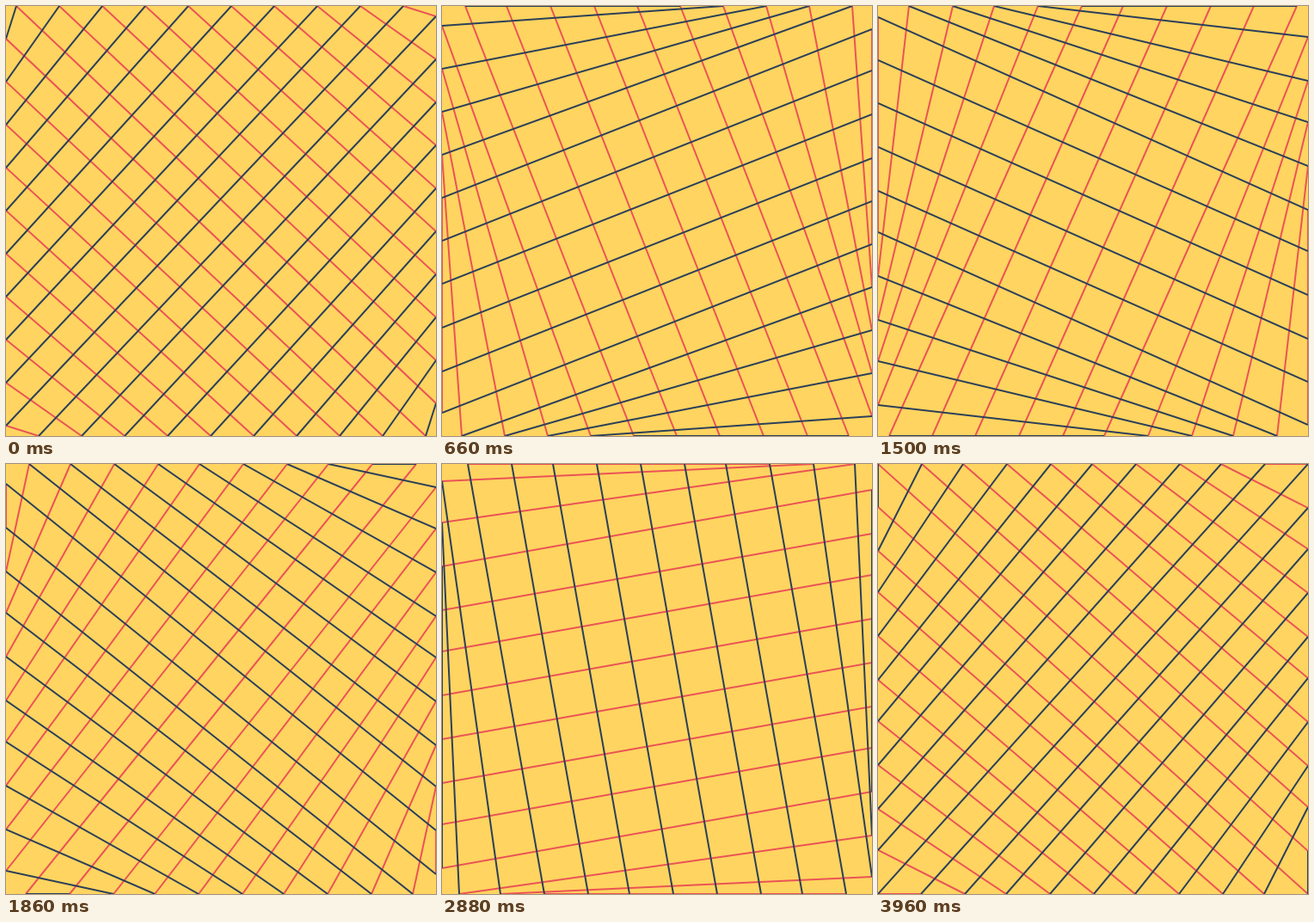
Recreate the animation shown at these times as an HTML page. Size 500 by 500 pixels, loop 4.02 s.

```html
<!DOCTYPE html>
<html lang="en">
<head>
<meta charset="utf-8">
<title>Rotating line weave</title>
<style>
  html, body { margin: 0; width: 100%; height: 100%; overflow: hidden; background: #ffd460; }
  svg { display: block; width: 100%; height: 100%; }
  path { fill: none; stroke-width: 2; }
</style>
</head>
<body>
<svg viewBox="0 0 500 500">
  <rect width="500" height="500" fill="#ffd460"/>
  <path id="red" stroke="#ea5455"/>
  <path id="navy" stroke="#2d4059"/>
</svg>
<script>
const SIZE = 500, POINTS = 40, SPACING = 50, STEP = 3;
const FRAME_MS = 60, LOOP_MS = 4020, TICKS_PER_FRAME = 5, FIRST_TICK = 4;
const SIDE_TICKS = Math.ceil(SIZE / STEP);
const red = document.getElementById('red');
const navy = document.getElementById('navy');

// Points travel clockwise and stop exactly on each corner before turning.
function pointAt(index, tick) {
  const start = index * SPACING;
  let side = Math.floor(start / SIZE);
  let along = start % SIZE;
  const toCorner = Math.ceil((SIZE - along) / STEP);
  if (tick >= toCorner) {
    const rest = tick - toCorner;
    side += 1 + Math.floor(rest / SIDE_TICKS);
    along = 0;
    tick = rest % SIDE_TICKS;
  }
  const d = along + tick * STEP;
  return [[d, 0], [SIZE, d], [SIZE - d, SIZE], [0, SIZE - d]][side % 4];
}

// Joins every pair of points whose indices add up to sum (modulo POINTS).
function weave(points, sum) {
  let path = '';
  points.forEach((a, i) => {
    const j = (sum - i + POINTS) % POINTS;
    if (i < j) path += `M${a}L${points[j]}`;
  });
  return path;
}

function draw(ms) {
  const frame = Math.floor((ms % LOOP_MS) / FRAME_MS);
  const tick = FIRST_TICK + frame * TICKS_PER_FRAME;
  const points = Array.from({ length: POINTS }, (_, i) => pointAt(i, tick));
  red.setAttribute('d', weave(points, POINTS / 2 - 1));
  navy.setAttribute('d', weave(points, POINTS - 1));
}

const begin = performance.now();
function loop() {
  draw(performance.now() - begin);
  requestAnimationFrame(loop);
}
loop();
</script>
</body>
</html>
```
